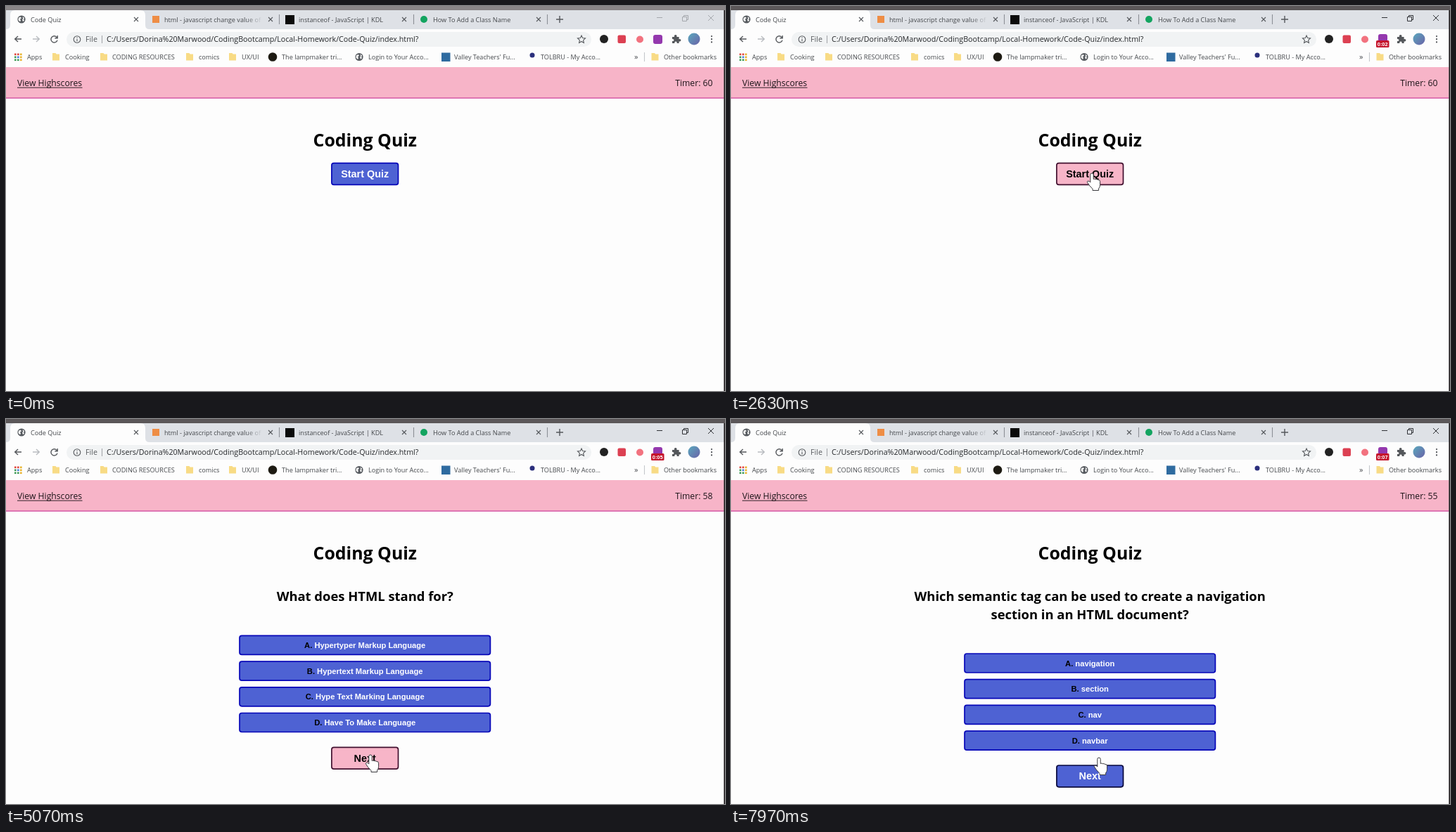
Animation of 1022x548 px, one loop 8000 ms. Source, as an HTML page:

```html
<!DOCTYPE html>
<html lang="en">
<head>
<meta charset="utf-8">
<title>Code Quiz</title>
<style>
html, body { margin: 0; width: 100%; height: 100%; overflow: hidden; background: #fdfdfd; }
svg { display: block; width: 1022px; height: 548px; }
text { font-family: "Open Sans", "Noto Sans", sans-serif; }
.ui text { font-size: 9.15px; fill: #45484c; }
.ui .url { font-size: 10.7px; fill: #26282b; }
.line { fill: none; stroke: #55585c; stroke-width: 1.4; }
.thin { stroke-width: 1.1; }
.page text { font-size: 12.2px; fill: #1c1418; }
.page .title { font-size: 24.9px; font-weight: 700; fill: #000; text-anchor: middle; }
.page .question { font-size: 18.4px; font-weight: 700; fill: #000; text-anchor: middle; }
.button rect { fill: #4e62d3; stroke: #0606b8; stroke-width: 1.7; }
.page .button text { font: 700 11.2px "Liberation Sans", Arial, sans-serif; fill: #fff; text-anchor: middle; }
.page .button.big text { font-size: 14.4px; }
.button tspan { fill: #000; }
.button.fresh rect { stroke: #08083c; }
.button.hover rect { fill: #f7b5c8; stroke: #41102f; }
.page .button.hover text { fill: #000; }
#badge text { font: 700 7.4px "Liberation Sans", Arial, sans-serif; fill: #fff; text-anchor: middle; }
#pointer path { fill: #fff; stroke: #3a3a3e; stroke-width: 1; stroke-linejoin: round; }
</style>
</head>
<body>
<svg viewBox="0 0 1022 548">
<defs>
  <linearGradient id="fade">
    <stop offset="0" stop-color="#dee1e6" stop-opacity="0"/><stop offset="1" stop-color="#dee1e6"/>
  </linearGradient>
  <linearGradient id="avatarFill" x2="1" y2="1">
    <stop offset="0" stop-color="#5aa9bd"/><stop offset="1" stop-color="#6a62a8"/>
  </linearGradient>
  <g id="globe">
    <circle r="5.6" fill="#55595e"/>
    <path d="M-4-2.6l3-1 1 2-2 1 1 2-1 2-2.6-2.4zM1.5-4l2.6 2-1 2 1 1.4-2 1.8-1-2.4 1-2z" fill="#f4f4f4"/>
  </g>
  <path id="folder" d="M-5-5h4.5l1.2 1.6H5V5.4H-5z" fill="#f8db85"/>
  <path id="cross" class="line thin" d="M-3-3l6 6M3-3l-6 6"/>
</defs>
<rect width="1022" height="548" fill="#fdfdfd"/>

<g class="ui">
  <rect y="5" width="1021" height="29" fill="#dee1e6"/>
  <rect id="strip" width="1022" height="6"/>
  <path d="M0 33q6 0 6-6V13q0-7 7-7h178q7 0 7 7v14q0 6 6 6z" fill="#fdfdfd"/>
  <rect y="33" width="1021" height="54" fill="#fdfdfd"/>

  <use href="#globe" x="22" y="19"/>
  <text x="35" y="22.5">Code Quiz</text>
  <rect x="208" y="14" width="10" height="10" fill="#ee8d45"/>
  <text x="225" y="22.5">html - javascript change value of</text>
  <rect x="340" y="10" width="25" height="18" fill="url(#fade)"/>
  <rect x="365" y="10" width="6" height="18" fill="#dee1e6"/>
  <rect x="397" y="13" width="13" height="13" fill="#0b0b0b"/>
  <text x="416" y="22.5">instanceof - JavaScript | KDL</text>
  <circle cx="594" cy="19" r="5" fill="#13a460"/>
  <text x="607" y="22.5">How To Add a Class Name</text>
  <use href="#cross" x="185" y="19"/><use href="#cross" x="376" y="19"/>
  <use href="#cross" x="566" y="19"/><use href="#cross" x="757" y="19"/>
  <path class="line thin" d="M388.5 12v14M579.5 12v14M769.5 12v14" style="stroke:#8c9096"/>
  <path class="line" d="M782 19h10M787 14v10"/>
  <path id="controls" class="line" style="stroke-width:1" d="M925 16.5h8M961.5 15.5h6v6h-6zM963.5 15.5v-2h6v6h-2M998 13l8 8M1006 13l-8 8"/>

  <path class="line" d="M22 47H13M17 43l-4.3 4 4.3 4M72.4 44.8A4.6 4.6 0 1 0 73 48.6M73.2 42v3.8h-3.8"/>
  <path class="line" d="M38 47h9M43 43l4.3 4-4.3 4" style="stroke:#b9bcc0"/>
  <rect x="86" y="37" width="746" height="21" rx="10.5" fill="#f1f3f4"/>
  <circle class="line thin" cx="101" cy="47.5" r="4.8"/>
  <path class="line thin" d="M101 47v3.2M101 44.6v1.2"/>
  <text class="url" x="113" y="51.4" style="fill:#5a5d61">File</text>
  <path class="line thin" d="M136.5 42v11" style="stroke:#a4a7ab"/>
  <text class="url" x="143" y="51.4">C:/Users/Dorina%20Marwood/CodingBootcamp/Local-Homework/Code-Quiz/index.html?</text>
  <path class="line thin" d="M818 42l1.6 3.6 3.9.4-2.9 2.6.8 3.9-3.4-2-3.4 2 .8-3.9-2.9-2.6 3.9-.4z"/>
  <circle cx="850" cy="47" r="6" fill="#222"/>
  <rect x="869.5" y="41.5" width="11.5" height="11.5" rx="2" fill="#dc4052"/>
  <circle cx="901" cy="47.5" r="5" fill="#f2727f"/>
  <rect id="recorder" x="920" y="41" width="13" height="13" rx="3" fill="#9438ae"/>
  <g id="badge">
    <rect x="917" y="49" width="18.5" height="10" rx="1.5" fill="#c5152c"/>
    <text x="926.2" y="56.8"></text>
  </g>
  <path d="M947 44h3q-.6-3 1.7-3t1.7 3h3.2v3.2q2.8-.5 2.8 1.6t-2.8 1.6V53h-3q.4-2.6-1.6-2.6T950.400 53H947v-3q2.500.3 2.500-1.500T947 47z" fill="#54575b"/>
  <circle cx="978" cy="47" r="8.500" fill="url(#avatarFill)"/>
  <path d="M1003 43h.01M1003 47.200h.01M1003 51.400h.01" stroke="#505358" stroke-width="2.200" stroke-linecap="round"/>

  <g id="apps"></g>
  <text x="30" y="76">Apps</text>
  <use href="#folder" x="71" y="72"/><text x="84" y="76">Cooking</text>
  <use href="#folder" x="139" y="72"/><text x="151" y="76">CODING RESOURCES</text>
  <use href="#folder" x="261" y="72"/><text x="274" y="76">comics</text>
  <use href="#folder" x="322" y="72"/><text x="335" y="76">UX/UI</text>
  <circle cx="379" cy="72.500" r="6.300" fill="#1d1a12"/>
  <text x="392" y="76">The lampmaker tri...</text>
  <use href="#globe" x="502" y="72.500"/><text x="515" y="76">Login to Your Acco...</text>
  <rect x="619" y="66.500" width="12.500" height="12.500" fill="#2f6ba0"/>
  <text x="637" y="76">Valley Teachers' Fu...</text>
  <circle cx="748" cy="70" r="3.500" fill="#2b2f7c"/>
  <text x="760" y="76">TOLBRU - My Acco...</text>
  <text x="893" y="75.500" style="font-size:11px">»</text>
  <path class="line thin" d="M907.500 66v13" style="stroke:#c4c7cb"/>
  <use href="#folder" x="922.500" y="72"/><text x="935" y="76">Other bookmarks</text>
</g>

<g class="page">
  <rect y="87" width="1020.500" height="44" fill="#f7b4c8"/>
  <path d="M0 131h1020.500" stroke="#d659a6" stroke-width="1.600"/>
  <text x="16" y="114.300">View Highscores</text>
  <path d="M16 116.200h92.500" stroke="#1c1418" stroke-width=".9"/>
  <text id="timer" x="1004.500" y="114.300" text-anchor="end"></text>
  <text class="title" x="510.300" y="199.500">Coding Quiz</text>
  <g id="scenes"></g>
</g>
<path d="M1021.200 6v542" stroke="#1d1a1c" stroke-width="1.600"/>

<g id="pointer">
  <path id="arrow" d="M0 0v18l4.200-4 2.900 6.800 3-1.300-2.900-6.600h6z"/>
  <path id="hand" d="M-2.200 2.200a2.200 2.200 0 0 1 4.400 0v6.300q1.200-1 3.400.2 1.200-.6 3.200.8 2.600-.3 2.800 2.200v5q0 3-2 5.200v2.600H1v-2.200q-4.500-4-7.700-9.600 0-2.600 3-1.200l1.500 1.600z"/>
</g>
</svg>

<script>
const LOOP = 8000, QUIZ_START = 2700, WINDOW_FOCUS = 2300, BADGE_START = 1000;
const CENTER = 510.2;
const $ = id => document.getElementById(id);
const show = (el, on) => el.setAttribute("visibility", on ? "visible" : "hidden");

function make(tag, attrs, parent, text) {
  const el = document.createElementNS("http://www.w3.org/2000/svg", tag);
  for (const key in attrs) el.setAttribute(key, attrs[key]);
  if (text) el.textContent = text;
  return parent.appendChild(el);
}

function addButton(parent, label, y, w, h, letter) {
  const el = make("g", { class: letter ? "button" : "button big" }, parent);
  const x = CENTER - w / 2;
  make("rect", { x, y, width: w, height: h, rx: 3.2 }, el);
  const text = make("text", { x: CENTER, y: y + h / 2 + (letter ? 4 : 5) }, el);
  if (letter) make("tspan", {}, text, letter + ". ");
  text.append(label);
  return { el, x, y, w, h };
}

const bigButton = (parent, label, y) => addButton(parent, label, y, 94.6, 30.8);

function addQuestion(start, lines, answers) {
  const el = make("g", {}, $("scenes"));
  const shift = (lines.length - 1) * 25.6;
  lines.forEach((line, i) =>
    make("text", { class: "question", x: CENTER, y: 259.4 + i * 25.6 }, el, line));
  const buttons = answers.map((answer, i) =>
    addButton(el, answer, 308.4 + shift + i * 36.7, 356.4, 27, "ABCD"[i]));
  buttons.push(bigButton(el, "Next", 467.4 + shift));
  return { start, el, buttons };
}

const intro = make("g", {}, $("scenes"));
const scenes = [
  { start: 0, el: intro, buttons: [bigButton(intro, "Start Quiz", 223.6)] },
  addQuestion(QUIZ_START, ["What does HTML stand for?"],
    ["Hypertyper Markup Language", "Hypertext Markup Language", "Hype Text Marking Language", "Have To Make Language"]),
  addQuestion(5250, ["Which is the correct CSS syntax?"],
    ["font: 12px;", "font-size: 12;", "text-size: 12px;", "font-size: 12px;"]),
  addQuestion(7880, ["Which semantic tag can be used to create a navigation", "section in an HTML document?"],
    ["navigation", "section", "nav", "navbar"])
];

const dotColors = ["#e0483e", "#e0483e", "#e8b32e", "#3f9b58", "#4a7fe0", "#e8b32e", "#3f9b58", "#3f9b58", "#e8b32e"];
dotColors.forEach((fill, i) =>
  make("rect", { x: 12 + i % 3 * 4, y: 67.5 + Math.floor(i / 3) * 4, width: 2.6, height: 2.6, fill }, $("apps")));

// Pointer stops: time, x, y
const stops = [
  [1200, 640, 556], [1650, 553, 318], [1760, 553, 318], [2250, 513, 238],
  [3600, 513, 238], [4200, 520, 352], [4450, 520, 352], [4850, 518, 478],
  [5600, 518, 478], [6300, 560, 398], [7000, 560, 398], [7600, 523, 482]
];

function pointerAt(t) {
  const next = stops.findIndex(s => s[0] > t);
  if (next === 0) return stops[0].slice(1);
  if (next < 0) return stops[stops.length - 1].slice(1);
  const [t0, x0, y0] = stops[next - 1], [t1, x1, y1] = stops[next];
  const p = (t - t0) / (t1 - t0), e = p * p * (3 - 2 * p);
  return [x0 + (x1 - x0) * e, y0 + (y1 - y0) * e];
}

function draw(t) {
  const current = scenes.filter(s => s.start <= t).pop();
  const fresh = current.start > 0 && t - current.start < 250;
  const [x, y] = pointerAt(t);
  const visible = t >= 1200 && (t < QUIZ_START || t > 3650);
  let over = false;

  scenes.forEach(s => show(s.el, s === current));
  current.buttons.forEach((b, i) => {
    const hover = visible && x >= b.x && x <= b.x + b.w && y >= b.y && y <= b.y + b.h;
    b.el.classList.toggle("hover", hover);
    b.el.classList.toggle("fresh", fresh && i === 4);
    over = over || hover;
  });

  $("pointer").setAttribute("transform", `translate(${x} ${y})`);
  show($("hand"), visible && (over || fresh));
  show($("arrow"), visible && !over && !fresh);

  const focused = t >= WINDOW_FOCUS;
  $("strip").setAttribute("fill", focused ? "#5b5759" : "#898587");
  $("controls").style.stroke = focused ? "#303236" : "#a5a8ad";

  const recording = t >= BADGE_START;
  show($("badge"), recording);
  $("recorder").setAttribute("y", recording ? 40 : 41);
  $("badge").lastElementChild.textContent = "0:0" + Math.floor(t / 1000);
  $("timer").textContent = "Timer: " + (60 - Math.max(0, Math.floor((t - QUIZ_START) / 1000)));
}

function tick() {
  draw(performance.now() % LOOP);
  requestAnimationFrame(tick);
}
draw(0);
requestAnimationFrame(tick);
</script>
</body>
</html>
```
